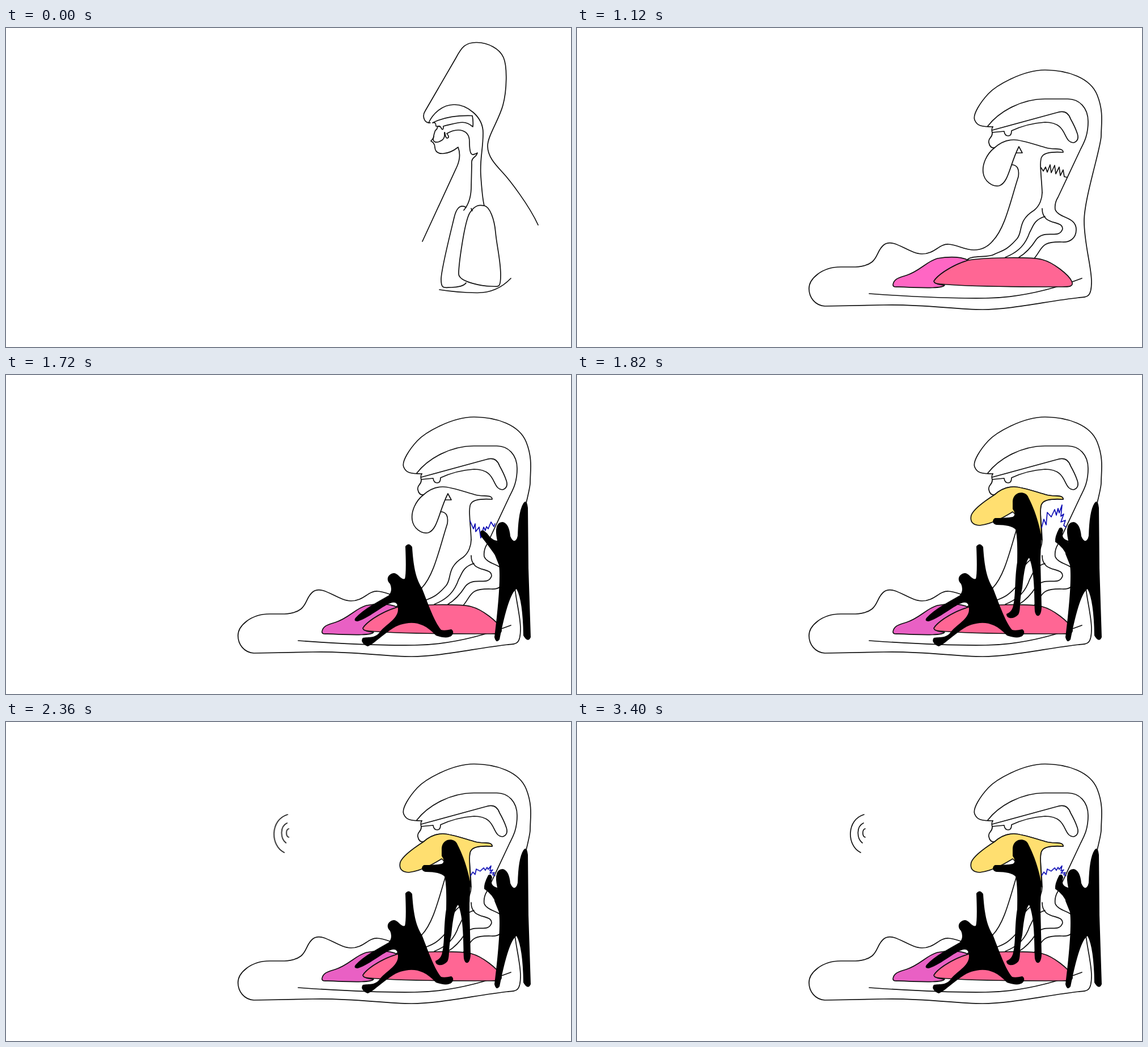
Recreate the animation shown at these times as an HTML page without scripts. Size 996 px wide and 562 px high, loop 3.42 s.

```html
<!DOCTYPE html>
<html lang="en">
<head>
<meta charset="utf-8">
<title>Voice</title>
<style>
html, body { margin: 0; width: 100%; height: 100%; overflow: hidden; background: #fff; }
svg { display: block; width: 100%; height: 100%; fill: none; stroke: #111; stroke-width: 1.7; stroke-linecap: round; stroke-linejoin: round; }
.step { animation: 3.42s step-end infinite; }
.move { animation: 3.42s linear infinite; }
.solid { fill: #000; stroke: none; }
.blue { stroke: #0a0ab4; }

.first { animation-name: first; }
.second { animation-name: second; }
.flat { animation-name: flat; }
.tongue { animation-name: tongue; }
.still { animation-name: still; }
.low { animation-name: low; }
.high { animation-name: high; }
.back { animation-name: lungs, tint; }
.front { animation-name: fill; }
.sitter { animation-name: sitter; }
.stander { animation-name: stander; }
.speaker { animation-name: speaker; }
.waves { animation-name: waves; }
.arm { animation-name: arm; }
.drift { animation-name: drift; }
.squash { animation-name: squash; transform-origin: 0 272px; }
.squash path { vector-effect: non-scaling-stroke; }

@keyframes first { from { visibility: visible } 11.69%, to { visibility: hidden } }
@keyframes second { from { visibility: hidden } 11.69%, to { visibility: visible } }
@keyframes flat { from { visibility: hidden } 11.69% { visibility: visible } 32.74%, to { visibility: hidden } }
@keyframes still { from { visibility: hidden } 11.69% { visibility: visible } 42.69%, to { visibility: hidden } }
@keyframes tongue { from { visibility: hidden } 11.69% { visibility: visible } 52.63%, to { visibility: hidden } }
@keyframes low { from { visibility: hidden } 42.69% { visibility: visible } 52.63%, to { visibility: hidden } }
@keyframes high { from { visibility: hidden } 52.63%, to { visibility: visible } }
@keyframes lungs { from { visibility: hidden } 32.74%, to { visibility: visible } }
@keyframes tint { from { fill: #ff66c4 } 36.25%, to { fill: #e960c4 } }
@keyframes fill { from { fill: #fff } 32.74%, to { fill: #ff6694 } }
@keyframes sitter { from { visibility: hidden } 36.25%, to { visibility: visible } }
@keyframes stander { from { visibility: hidden } 42.69%, to { visibility: visible } }
@keyframes speaker { from { visibility: hidden } 52.63%, to { visibility: visible } }
@keyframes waves { from { visibility: hidden } 60.81%, to { visibility: visible } }
@keyframes drift {
  from, 60.81% { transform: translateX(60px) }
  63.7% { transform: translateX(39px) }
  72.5% { transform: translateX(-41px) }
  79.5%, to { transform: none }
}
@keyframes squash {
  from, 60.6% { transform: none }
  66%, to { transform: scaleY(.43) }
}
@keyframes arm {
  from, 50.8% { d: path("M864 320Q850 300 838 285Q833 272 842 274Q848 278 852 284Q858 291 866 292Z") }
  53.2%, to { d: path("M864 320Q858 304 843 294Q842 285 850 270Q855 266 857 274Q852 288 866 292Z") }
}
</style>
</head>
<body>
<svg viewBox="0 0 996 562" preserveAspectRatio="none">
  <g class="step first">
    <path d="M748 167C737 168 733 155 739 146L793 53C803 34 810 25 830 25.500S870 36 877 52 883 110 876 136 849 190 849 208 862 240 875 254 922 312 938 347"/>
    <path d="M745 167C752 152 768 135 790 135S841 155 841 185 835 230 837 260 841 305 843 313"/>
    <path d="M752 167Q780 153 822 154.500Q824 164 823 174C808 161 797 167 771 173Q771 184 766 174L758 173Q758 165 752 167"/>
    <path d="M765 173C757 172 763 178 757 180Q754 188 754 191T749 199Q756 203 756 210C757 226 779 224 797 210Q803 226 795 244L734 376"/>
    <path d="M754 191C750 203 760 203 768 198S772 186 773 184 774 195 778 194 780 189 777 186C798 174 817 180 817 200C817 227 822 225 831 220Q830 224 825 228T821 240L820 283Q819 307 807 321"/>
    <path d="M811 316C799 309 793 321 790 334S767 425 767 443 773 457 785 457 808 454 811 449M820 318L822 322"/>
    <path d="M843 313C853 315 861 337 863 360S872 410 872 435 868 455 855 455 798 448 798 433 808 340 818 325 836 312 843 313Z"/>
    <path d="M764 461Q795 466 830 466.500T890 441"/>
  </g>

  <g class="step second">
    <path d="M733 174C712 174 705 172 701 162S712 130 725 116 785 74 825 74 905 88 917 118 924 170 924 190 894 300 894 340 907 420 907 447 900 474 885 475"/>
    <path d="M885 475C830 481 765 496 715 496S610 486 540 488L437 490C420 489 409 475 409 459S430 421 465 421H491C535 418 524 395 541 382S585 398 608 398 638 380 655 381 682 391 700 391 728 381 733 375"/>
    <path d="M733 375C755 352 764 305 778 262Q781 241 766 241"/>
    <path d="M724 173C745 146 785 125 825 125H865C885 125 901 140 901 165S893 203 888 213L848 298C843 306 842 313 843 320C850 336 880 332 880 355C880 372 867 378 855 377C815 376 822 388 805 407"/>
    <path d="M733 174Q730 178 732 184L753 182Q754 190 760 190T766 181C790 170 810 167 825 166C867 166 855 202 876 202Q886 198 882 186T870 160Q864 143 846 149L732 180"/>
    <path d="M732 184C733 194 724 193 726 202Q728 212 736 211C745 203 755 197 770 197S812 207 827 211 857 210 857 219Q826 217 820 226C814 233 819 262 820 290"/>
    <path d="M820 290C820 300 816 313 806 321C775 340 787 360 775 372C755 395 745 393 735 399S692 400 688 409"/>
    <path d="M820 318C820 350 856 337 856 354C850 373 825 354 810 372Q796 394 779 404"/>
    <path d="M825 332C805 338 804 350 798 360C791 380 780 394 755 404"/>
    <path d="M515 468Q640 477 720 476T890 441"/>
    <path class="step tongue" d="M736 211C722 222 714 240 716 255S732 280 744 278C761 273 763 240 779 209L785 220H774"/>
    <path class="step still" d="M818 246L822 252 826 245 829 254 834 241 836 255 842 242 844 257 850 245 852 260 857 250 859 262 864 263"/>

    <path class="step back" d="M557 453C558 442 567 440 580 436C605 428 615 412 635 406Q670 400 690 409C665 416 640 432 631 443Q628 452 648 453C645 459 620 458 565 456Q558 457 557 453Z"/>
    <path class="step front" d="M629 446C634 438 655 420 690 409C725 404 800 403 820 408S867 435 872 446 865 456 850 456Q690 456 640 451Q630 451 629 446Z"/>
    <path class="step flat" d="M689 409Q650 409 625 414T530 451Q526 457 560 457H640L699 455"/>
  </g>

  <path class="step speaker" fill="#ffdf70" d="M736 211C745 203 755 197 770 197S812 207 827 211 857 210 857 219Q826 217 820 226C814 233 819 262 819 290L768 241Q735 262 710 265Q691 264 695 247Q700 234 736 211Z"/>

  <path class="step low blue" d="M818 257L824 271 827 262 828 276 834 268 837 287 842 268 845 274 847 267 850 271 855 259 860 267 862 262"/>
  <g class="step high blue">
    <g class="move squash">
      <path d="M819 269L823 254 827 264 829 242 836 250 842 237 845 247 848 235 850 243 855 229 853 249 858 245 853 259 861 256 858 265 862 268"/>
    </g>
  </g>

  <path class="solid step speaker" d="M768 222C770 204 790 204 795 214C804 232 812 250 819 285Q817 310 817 330L819 410C818 428 809 428 807 416C806 390 807 345 797 322Q789 330 785 375C779 400 783 413 778 422C770 431 757 430 757 421Q765 418 768 410C774 390 771 360 776 330Q777 285 773 272Q765 264 740 264C732 263 731 255 737 252Q755 252 768 250Q775 246 768 236Z"/>
  <path class="solid step sitter" d="M704 302Q710 294 716 303C718 335 722 358 733 375C745 405 755 435 767 449Q773 451 785 448C792 451 790 470 758 459C735 434 715 434 695 440S645 478 637 478Q623 471 629 463C640 461 650 464 658 454C668 440 692 430 691 412C690 380 650 425 620 434Q612 434 616 428C630 412 655 400 675 388Q682 379 677 368C667 358 677 349 684 349S697 362 703 359Q706 350 704 302Z"/>
  <g class="solid step stander">
    <path d="M912 226Q918 217 920 234L921 340L925 462Q920 473 912 459Q911 397 900 377Q886 385 870 466Q864 474 861 462Q873 365 869 335L861 315L866 292Q859 259 876 259Q887 262 889 284Q896 300 902 285Q903 240 912 226Z"/>
    <path class="move arm" d="M864 320Q858 304 843 294Q842 285 850 270Q855 266 857 274Q852 288 866 292Z"/>
  </g>

  <g class="step waves">
    <path class="move drift" d="M506 163C475 172 475 218 500 230M505 178C492 184 493 205 503 213M508 188C502 190 503 202 508 203"/>
  </g>
</svg>
</body>
</html>
```
